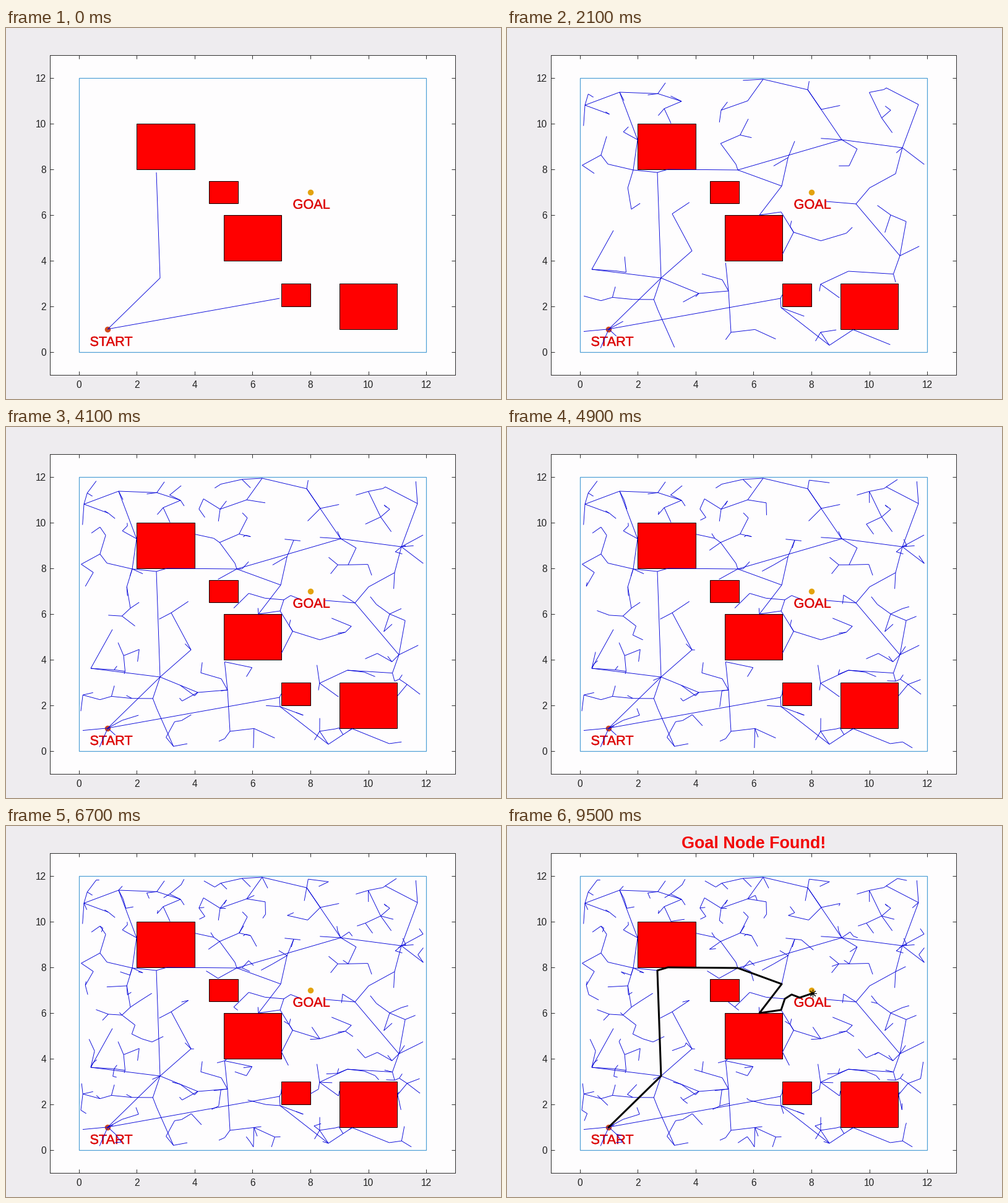
A matplotlib script for the animation above (9.6 s loop, 800x601 px).

```python
import numpy as np
import matplotlib.pyplot as plt
from matplotlib.animation import FuncAnimation
from matplotlib.collections import LineCollection
from matplotlib.patches import Rectangle
from matplotlib.patheffects import withStroke

plt.rcParams["font.family"] = "Liberation Sans"

W, H, DPI = 800, 601, 100
LEFT, RIGHT, TOP, BOTTOM = 70.9, 725.9, 44.2, 561.7
FRAMES, INTERVAL, FOUND = 96, 100, 74
PX = 72 / DPI
SX, SY = (RIGHT - LEFT) / 14, (BOTTOM - TOP) / 14

OBSTACLES = [(2, 8, 2, 2), (4.5, 6.5, 1, 1), (5, 4, 2, 2), (7, 2, 1, 1), (9, 1, 2, 2)]
START, GOAL = (1, 1), (8, 7)

# Key tree points in stage pixels; each joins the nearest point already there.
FIRST = [(442, 438), (249, 405), (243, 234)]
LIMBS = [
    (260, 229), (373, 230), (541, 181), (639, 194), (665, 124), (137, 391),
    (172, 328), (204, 230), (211, 181), (182, 104), (126, 125), (486, 100),
    (414, 83), (628, 236), (586, 259), (564, 285), (444, 256), (408, 303),
    (299, 361), (267, 301), (310, 430), (358, 426), (362, 493),
]
LATE_LIMBS = [(443, 298), (635, 369), (516, 281), (443, 453), (521, 514),
              (389, 118), (613, 97)]
APPROACH = [(449, 280), (460, 273), (473, 278)]
LAST = (494, 271)
RANDOM_NODES = 360

rng = np.random.default_rng(12)
nodes, parents, births = [np.array(START, float)], [None], [0]


def unit(x, y):
    """Stage pixels to axis units."""
    return np.array([(x - LEFT) / SX - 1, (BOTTOM - y) / SY - 1])


def nearest(p):
    return int(np.argmin(np.hypot(*(np.array(nodes) - p).T)))


def add(p, birth):
    """Join p to the tree, never earlier than its parent (in frames)."""
    parent = nearest(p)
    nodes.append(p)
    parents.append(parent)
    births.append(max(birth, births[parent]))


def add_points(points, begin, end):
    for x, y in points:
        add(unit(x, y), rng.uniform(begin, end))


def blocked(p):
    return any(x < p[0] < x + w and y < p[1] < y + h for x, y, w, h in OBSTACLES)


def reach(a, b):
    """Last free point on the way from a to b."""
    free = a
    for t in np.linspace(0.05, 1, 20):
        p = a + (b - a) * t
        if blocked(p):
            break
        free = p
    return free


def grow(count):
    """Extend the tree towards random samples, away from the goal."""
    step = FOUND / count
    birth = step
    while birth < FOUND:
        sample = rng.uniform(0.05, 11.95, 2)
        base = nodes[nearest(sample)]
        p = reach(base, sample)
        if np.hypot(*(p - GOAL)) > 0.85 and np.hypot(*(p - base)) > 0.1:
            add(p, birth)
            birth += step


def trace(i):
    """Points from the root to node i."""
    path = []
    while i is not None:
        path.append(nodes[i])
        i = parents[i]
    return np.array(path[::-1])


add_points(FIRST, 0, 0)
add_points(LIMBS, 0.5, 8)
add_points(LATE_LIMBS, 9, 21)
add_points(APPROACH, 22, 38)
grow(RANDOM_NODES)
add_points([LAST], FOUND, FOUND)
route = trace(len(nodes) - 1)

fig = plt.figure(figsize=(W / DPI, H / DPI), dpi=DPI, facecolor="#eeecef")
ax = fig.add_axes([LEFT / W, 1 - BOTTOM / H, (RIGHT - LEFT) / W, (BOTTOM - TOP) / H],
                  facecolor="#fefdfe")
ax.set(xlim=(-1, 13), ylim=(-1, 13), xticks=range(0, 13, 2), yticks=range(0, 13, 2))
ax.tick_params(direction="in", top=True, right=True, length=6 * PX, width=PX,
               color="#303030", labelcolor="#202020", labelsize=15.5 * PX)
ax.tick_params(axis="x", pad=9.5 * PX)
ax.tick_params(axis="y", pad=6 * PX)
for spine in ax.spines.values():
    spine.set(linewidth=PX, edgecolor="#303030")

ax.add_patch(Rectangle((0, 0), 12, 12, fill=False, ec="#4d9fd6", lw=1.2 * PX, zorder=1))
for x, y, w, h in OBSTACLES:
    ax.add_patch(Rectangle((x, y), w, h, fc="#ff0000", ec="#100000", lw=PX, zorder=2))

for (x, y), color in ((START, "#d2491c"), (GOAL, "#e3a30f")):
    ax.plot(x, y, "o", ms=9.5 * PX, mew=0, color=color, zorder=3)
for label, x, y in (("START", 135.5, 515), ("GOAL", 463.5, 292.7)):
    ax.text(*unit(x, y), label, color="#dd0808", size=21.7 * PX, va="baseline", zorder=3,
            path_effects=[withStroke(linewidth=0.4 * PX, foreground="#dd0808")])

tree = LineCollection([], colors="#0000d8", linewidths=0.9 * PX, zorder=4)
ax.add_collection(tree)
path_line, = ax.plot(*route.T, color="black", lw=3 * PX, zorder=5,
                     solid_joinstyle="round")
star, = ax.plot(*route[-1], marker=(8, 2, 0), ms=12 * PX, mew=PX, color="black", zorder=6)
title = fig.text(398.5 / W, 1 - 35.5 / H, "Goal Node Found!", color="#f20808",
                 size=27 * PX, weight="bold", ha="center", va="baseline")


def draw(frame):
    tree.set_segments([(nodes[parents[i]], nodes[i])
                       for i in range(1, len(nodes)) if births[i] <= frame])
    for part in (path_line, star, title):
        part.set_visible(frame >= FOUND)
    return tree, path_line, star, title


anim = FuncAnimation(fig, draw, frames=FRAMES, interval=INTERVAL, repeat=True,
                     repeat_delay=0, blit=False)
plt.show()
```
